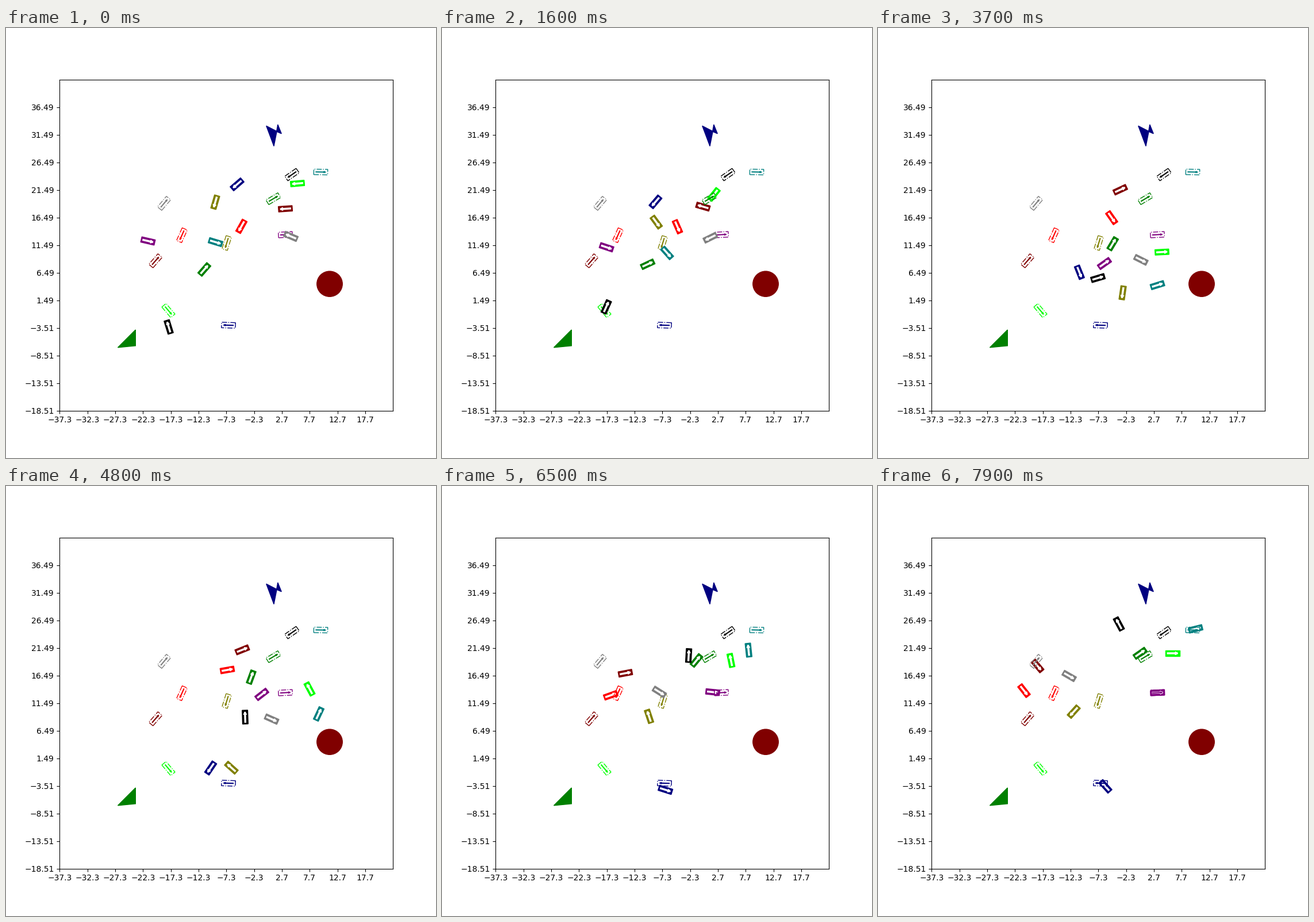
Write a matplotlib script that moves like this. It is 748 px wide and 748 px high and loops after 8000 ms.

```python
import numpy as np
import matplotlib.pyplot as plt
from matplotlib.animation import FuncAnimation
from matplotlib.patches import Circle, Polygon

SIZE, DPI = 748, 100
FRAMES, INTERVAL = 80, 100
STOPS = [1, 29, 48, 79]              # frames at which each leg of a drive begins or ends
EASE = [lambda u: u ** 1.7,          # pull away from rest
        lambda u: u,
        lambda u: 1 - (1 - u) ** 1.3]    # slow down on arrival

fig = plt.figure(figsize=(SIZE / DPI, SIZE / DPI), dpi=DPI)
fig.subplots_adjust(left=.1248)
ax = fig.add_subplot()
X0, Y0, SPAN, STEP = -37.3, -18.51, 60, 5
ax.set(xlim=(X0, X0 + SPAN), ylim=(Y0, Y0 + SPAN),
       xticks=X0 + STEP * np.arange(SPAN // STEP),
       yticks=Y0 + STEP * np.arange(SPAN // STEP))

BODY = np.array([(-1.25, -.5), (1.25, -.5), (1.25, .5), (-1.25, .5)])
ARROW = np.array([(-.9, -.05), (.55, -.05), (.55, -.16), (.92, 0),
                  (.55, .16), (.55, .05), (-.9, .05)])


def data(*points):
    """Stage pixels (y down) to axes units."""
    flipped = [(x, SIZE - y) for x, y in points]
    return ax.transData.inverted().transform(flipped)


def unit(deg):
    a = np.radians(deg)
    return np.array([np.cos(a), np.sin(a)])


def place(shape, pos, deg):
    c, s = unit(deg)
    return shape @ np.array([(c, s), (-s, c)]) + pos


def patch(points, color, **style):
    return ax.add_patch(Polygon(points, closed=True, color=color, **style))


class Car:
    """Drives through poses (x, y, heading); the last `back` legs are reversed."""

    def __init__(self, color, goal, *poses, back=0):
        self.points = data(*(p[:2] for p in poses))
        self.angles = [p[2] for p in poses]
        self.back = back
        self.body = patch(BODY, color, lw=1)
        self.arrow = patch(ARROW, "white", lw=1.8)
        spot = data(goal[:2])[0]
        patch(place(BODY, spot, goal[2]), color, fill=False, lw=1, ls="dashdot")
        patch(place(ARROW, spot, goal[2]), color, lw=.8)

    def pose(self, frame):
        t = max(frame, STOPS[0])
        leg = min(np.searchsorted(STOPS, t, side="right"), len(STOPS) - 1) - 1
        start, end = STOPS[leg:leg + 2]
        u = EASE[leg]((t - start) / (end - start))
        p, q = self.points[leg:leg + 2]
        a, b = self.angles[leg:leg + 2]
        gear = -1 if leg >= len(EASE) - self.back else 1

        # cubic that follows a circular arc for the given turn
        half = max(abs(np.radians(b - a)) / 2, 1e-3)
        speed = gear * np.hypot(*(q - p)) * min(half / np.sin(half), 1.7)
        m, n, d = speed * unit(a), speed * unit(b), q - p
        c2, c3 = 3 * d - 2 * m - n, m + n - 2 * d
        pos = p + u * (m + u * (c2 + u * c3))
        dx, dy = gear * (m + u * (2 * c2 + 3 * u * c3))
        return pos, np.degrees(np.arctan2(dy, dx))

    def move(self, frame):
        pose = self.pose(frame)
        self.body.set_xy(place(BODY, *pose))
        self.arrow.set_xy(place(ARROW, *pose))


patch(data((452.8, 170.3), (470.7, 179.5), (472.8, 168), (479.2, 183.8),
           (471, 180.3), (466, 205.5)), "navy", lw=1)
patch(data((225.3, 525), (194.5, 555.8), (225.3, 552.8)), "green", lw=1)
ax.add_patch(Circle(data((563, 445.2))[0], 2.3, color="maroon", lw=1))

cars = [
    Car("olive", (384, 374, 253),
        (364, 303, 254), (422, 400.5, 287), (392, 490, 138), (340.5, 392.5, 228)),
    Car("maroon", (260, 405, 49),
        (486, 314.5, 184), (427, 276.5, 62), (411, 285, 22), (277.5, 313, -50), back=2),
    Car("lime", (282.5, 491.5, 310),
        (507, 270.5, 185), (457.5, 367.5, 282), (528, 353, 478), (512.5, 291, 360)),
    Car("purple", (486, 359.5, 3),
        (247, 370.5, 347), (355.5, 414, 327), (445, 362.5, 398), (486.5, 359.5, 362)),
    Car("red", (306, 360.5, 246),
        (409.5, 345, 241), (410, 347, 255), (385, 320, 370), (254, 356, 308), back=2),
    Car("green", (465, 297, 31),
        (345, 420, 49), (386, 399, 32), (426.5, 332.5, 70), (456, 291, 35)),
    Car("navy", (387, 517, 178),
        (402, 272, 221), (338, 373.5, 265), (356, 490.5, 236), (395.5, 522.5, 492)),
    Car("teal", (547.5, 250.5, -1),
        (364.5, 372.5, 343), (434.5, 441, 325), (544, 396.5, 425), (552.5, 248.5, 374)),
    Car("black", (497.5, 255, 215),
        (283, 520, 107), (340, 443.5, 10), (416, 402, 92), (419, 240, 118)),
    Car("gray", (275, 305, 50),
        (495.5, 362.5, 157), (454, 401.5, 328), (462, 405.5, 336), (332.5, 330.5, 330),
        back=1),
]


def update(frame):
    for car in cars:
        car.move(frame)
    return [part for car in cars for part in (car.body, car.arrow)]


anim = FuncAnimation(fig, update, frames=FRAMES, interval=INTERVAL,
                     init_func=lambda: update(0), repeat=True, repeat_delay=0)
plt.show()
```
